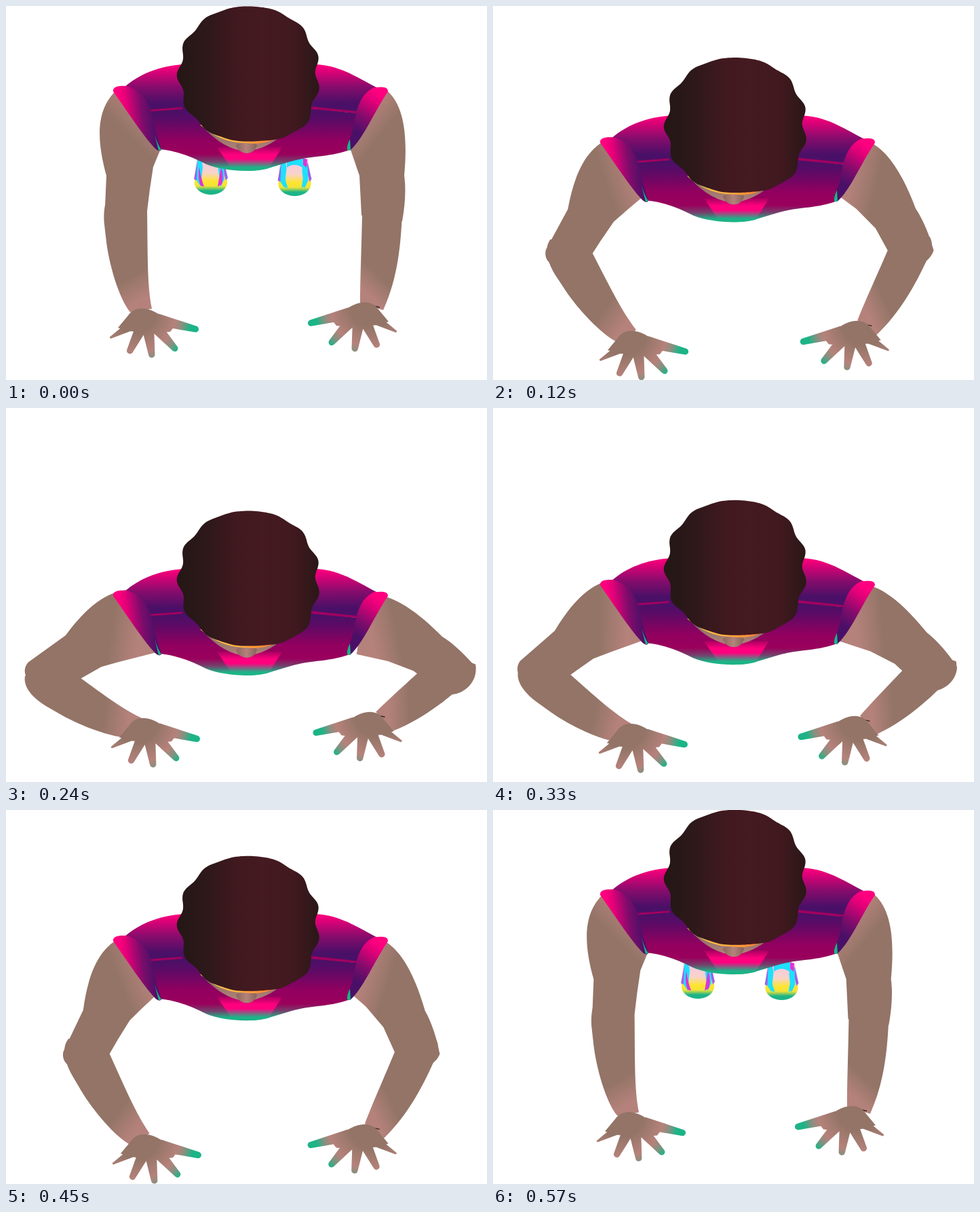
An HTML page for the animation above (600 ms loop, 709 by 551 pixels).

```html
<!DOCTYPE html>
<html lang="en">
<head>
<meta charset="utf-8">
<title>Push-ups</title>
<style>
  html, body { margin: 0; width: 100%; height: 100%; overflow: hidden; background: #fff; }
  svg { display: block; width: 100vw; height: 100vh; }
</style>
</head>
<body>
<svg id="stage" viewBox="0 0 709 551"></svg>
<script>
const SKIN = '#937467', BLUSH = '#b5827b', GREEN = '#1cb487', PINK = '#ff007f',
      PURPLE = '#4a1067', WINE = '#9a005c', CYAN = '#1ee0ff', MAGENTA = '#dd33d8';

const stopList = stops => stops.map(([at, color]) =>
  `<stop offset="${at}" stop-color="${color}"/>`).join('');
const linear = (id, x1, y1, x2, y2, ...stops) =>
  `<linearGradient id="${id}" gradientUnits="userSpaceOnUse" x1="${x1}" y1="${y1}" x2="${x2}" y2="${y2}">${stopList(stops)}</linearGradient>`;
const radial = (id, cx, cy, r, ...stops) =>
  `<radialGradient id="${id}" gradientUnits="userSpaceOnUse" cx="${cx}" cy="${cy}" r="${r}">${stopList(stops)}</radialGradient>`;
const skinFade = (id, x1, y1, x2, y2) =>
  linear(id, x1, y1, x2, y2, [0, BLUSH], [.35, BLUSH], [1, SKIN]);
const shape = (d, fill) => `<path d="${d}" fill="${fill}"/>`;

const defs = [
  linear('hair', 252, 0, 462, 0, [0, '#241715'], [.2, '#2d181a'], [.42, '#40191f'],
    [.6, '#451a21'], [.82, '#40191f'], [1, '#2a1717']),
  linear('back', 0, 86, 0, 146, [0, PINK], [.12, '#e80078'], [.55, '#870c6c'], [.95, PURPLE]),
  linear('front', 0, 154, 0, 243, [0, PURPLE], [.15, '#5a0b66'], [.5, '#92005f'], [.72, WINE],
    [.84, '#75406c'], [.95, GREEN]),
  linear('collar', 0, 206, 0, 243, [0, WINE], [.35, PINK], [.52, PINK], [.86, GREEN]),
  linear('sleeveL', 167, 142, 219, 136, [0, PINK], [.2, '#e40078'], [.6, '#7d0c6b'], [.95, PURPLE]),
  linear('sleeveR', 548, 128, 512, 182, [0, PINK], [.25, '#dc0077'], [.65, '#800c6b'], [1, PURPLE]),
  linear('band', 290, 0, 408, 0, [0, '#ffd04a'], [.5, '#ffac3c'], [1, '#ff6a2a']),
  linear('face', 0, 190, 0, 212, [0, SKIN], [1, '#b0807a']),
  linear('nose', 339, 0, 370, 0, [0, '#8a685d'], [.5, BLUSH], [1, '#84645a']),
  skinFade('upperL', 250, 168, 203, 214),
  skinFade('upperR', 488, 176, 535, 214),
  skinFade('foreL', 213, 450, 184, 398),
  skinFade('foreR', 522, 438, 556, 402),
  radial('hand', 190, 450, 88, [0, SKIN], [.36, SKIN], [.7, BLUSH], [.82, '#8a8f80'], [.96, GREEN]),
  linear('shoe', 0, 0, 0, 49, [0, '#f6c9e2'], [.35, '#f7d4c8'], [.6, '#ffe42e'],
    [.74, '#f0e338'], [.88, GREEN]),
].join('');

const shoe = (x, y, trim) => `<g transform="translate(${x} ${y})">
  ${shape('M4 -6Q0 12 0 34C6 54 43 54 48 33Q48 12 43 -6Z', 'url(#shoe)')}
  ${shape('M4 0L-1 26L3 28L7 4ZM43 0L49 24L46 28L40 4Z', '#9a62e8')}
  ${shape('M4 -2L3 28L9 37L12 8L10 -4ZM36 -4L35 12L38 38L44 26L43 4Z', CYAN)}
  ${shape('M7 8Q9 24 14 37L9 36Q4 24 7 8ZM39 8L34 37L40 34Q44 20 39 8Z', trim)}
</g>`;

const shoes = shoe(278, 229, MAGENTA) + shoe(401.5, 231, CYAN)
  + shape('M414 224H438L437 238Q425 230 414 238Z', CYAN)
  + shape('M438 224L444 226L443 238L438 234Z', MAGENTA);

// Tapered finger fanning out from the palm; the first one ends in a point
function finger(i) {
  const reach = 55 + 2.9 * (i - 1.4) ** 2, tip = i ? 4.7 : 1.5;
  return `<g transform="translate(207 458) rotate(${150 - 34 * i})">
    <path d="M16 -9L${reach} ${-tip}A${tip} ${tip} 0 0 1 ${reach} ${tip}L16 9Z"/></g>`;
}
const palm = 'M180 456C190 441 210 443 228 456L252 467L242 480Q212 484 183 479L165 474Z';

// The gradient belongs to the whole hand, so the outline acts as a clip
const handClip = () => {
  const center = [207, 458];
  const place = (r, side, angle) => {
    const c = Math.cos(angle), s = Math.sin(angle);
    return `${center[0] + r * c - side * s} ${center[1] + r * s + side * c}`;
  };
  const outline = [0, 1, 2, 3, 4].map(i => {
    const angle = (150 - 34 * i) * Math.PI / 180;
    const reach = 55 + 2.9 * (i - 1.4) ** 2, tip = i ? 4.7 : 1.5;
    return `M${place(16, -9, angle)}L${place(reach, -tip, angle)}` +
      `A${tip} ${tip} 0 0 1 ${place(reach, tip, angle)}L${place(16, 9, angle)}Z`;
  });
  return palm + outline.join('');
};
const hand = shape(handClip(), 'url(#hand)');

const leftArm = `<g id="upperArmL">
  ${shape('M164 123C134 150 132 192 148 250L145 318C150 340 180 342 208 302L212 270L217 237L227 213L250 161Z', 'url(#upperL)')}
  <g id="forearmL">
    ${shape('M162 270C146 278 143 300 145 322L148 348C152 380 166 430 183 451L215 446C208 410 209 370 208 302Z', 'url(#foreL)')}
    <g id="handL">${hand}</g>
  </g></g>`;

const rightArm = `<g id="upperArmR">
  ${shape('M562 125C588 148 592 195 587 250C590 270 588 295 584 317C570 332 540 332 524 308L521 250L508 212L486 170Z', 'url(#upperR)')}
  <g id="forearmR">
    ${shape('M574 284C580 288 584 296 584 305C582 350 578 400 556 448L522 438C522 400 524 360 525 305Z', 'url(#foreR)')}
    <g id="handR">
      <path d="M538 441L551 444" stroke="#3a2420" stroke-width="1.4"/>
      <g transform="translate(729 -9) scale(-1 1)">${hand}</g>
    </g>
  </g></g>`;

const torso = [
  shape('M172 122C190 104 222 88 262 86H456C490 87 516 104 548 121L520 158L452 152H258L207 156Z', 'url(#back)'),
  shape('M205 155L258 151H452L518 158L509 211C480 223 450 220 420 229L390 238C370 246 320 244 295 233C275 223 255 214 227 211Z', 'url(#front)'),
  shape('M206 153L260 149V152L207 156ZM450 148L517 155V158L450 152Z', '#a0005f'),
  shape('M311 208L332 239Q362 247 388 238L407 208Z', 'url(#collar)'),
  shape('M158 126C157 119 165 117 178 118C202 124 214 145 218 172C221 190 226 200 229 212Q225 216 218 208C200 188 178 154 158 126Z', 'url(#sleeveL)'),
  shape('M563 126C563 119 556 119 543 120C526 127 517 146 514 170C511 190 504 198 503 209Q505 216 512 208C530 188 544 154 563 126Z', 'url(#sleeveR)'),
  shape('M219 189Q223 203 229 212L225 213ZM507 196Q502 206 503 212L508 213Z', GREEN),
].join('');

// Superellipse, fuller at the lower right, with curls along the sides
function hairOutline() {
  const points = [];
  for (let deg = 0; deg < 360; deg += 2) {
    const a = deg * Math.PI / 180, c = Math.cos(a), s = Math.sin(a);
    const power = 2.15 + .65 * Math.exp(-3 * (a - .9) ** 2);
    const radius = (Math.abs(c) ** power + Math.abs(s) ** power) ** (-1 / power);
    const curl = -3.8 * c * c * Math.cos(13 * (a - 2.88));
    points.push(`${(357.5 + (102 * radius + curl) * c).toFixed(1)} ${(100 + (99.5 * radius + curl) * s).toFixed(1)}`);
  }
  return `M${points.join('L')}Z`;
}

const head = [
  shape('M288 176Q322 213 355 214Q384 211 410 188Z', 'url(#face)'),
  shape('M339 206C338 200 370 198 370 206Q366 217 355 217Q344 217 339 206Z', 'url(#nose)'),
  shape('M286 175Q318 203 355 202Q385 206 410 188L380 180Z', 'url(#band)'),
  shape(hairOutline(), 'url(#hair)'),
].join('');

document.getElementById('stage').innerHTML =
  `<defs>${defs}</defs>${shoes}<g id="figure">${leftArm}${rightArm}${torso}${head}</g>`;

const setTransform = (id, value) => document.getElementById(id).setAttribute('transform', value);
const turn = (id, angle, x, y) => setTransform(id, `rotate(${angle} ${x} ${y})`);

// Linear drop and rise in 30 ms steps; the hands counter-rotate to stay level
function pose(time) {
  const step = Math.floor(time / 30) % 20;
  const falling = step <= 9;
  const depth = falling ? step / 9 : (18.96 - step) / 10;
  const sway = (falling ? 1 : -.8) * Math.sin(Math.PI * depth);
  const upperL = 58.3 * depth, foreL = 60 * depth;
  const upperR = 56 * depth + sway, foreR = 52 * depth - sway;

  setTransform('figure', `translate(0 ${170 * depth})`);
  turn('upperArmL', upperL, 186, 155);
  turn('forearmL', -upperL - foreL, 184.5, 303.5);
  turn('handL', foreL, 207, 462);
  turn('upperArmR', -upperR, 546, 158);
  turn('forearmR', upperR + foreR, 567, 305);
  turn('handR', -foreR, 532, 456);
}

const start = performance.now();
function tick() {
  pose(performance.now() - start);
  requestAnimationFrame(tick);
}
tick();
</script>
</body>
</html>
```
